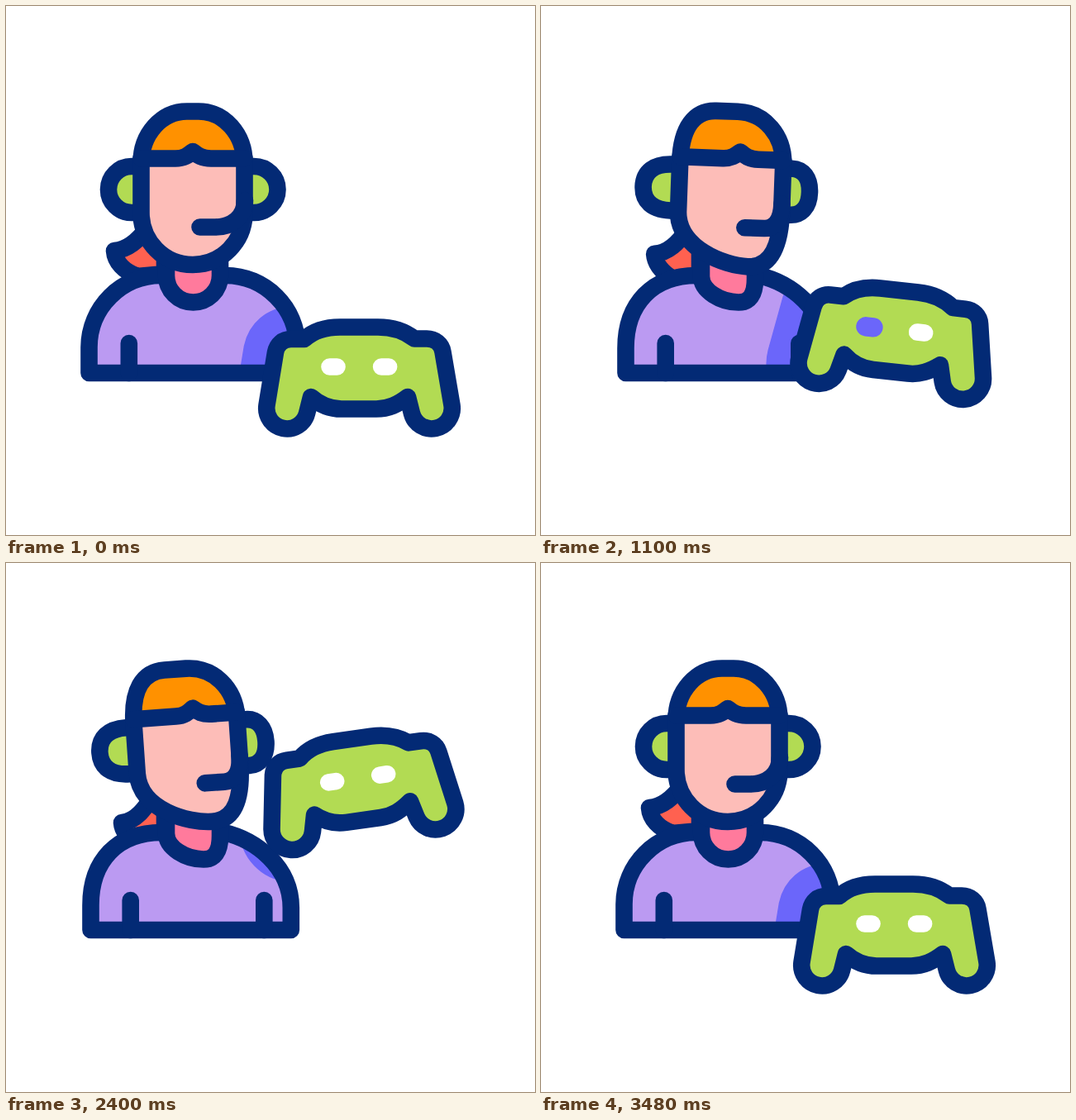
Animation, 640 px wide and 640 px high, one loop 3.6 s. Source, as an HTML page:

```html
<!DOCTYPE html>
<html lang="en">
<head>
<meta charset="utf-8">
<title>Gamer with headset</title>
<style>
  html, body { margin: 0; width: 100%; height: 100%; overflow: hidden; background: #fff; }
  svg { display: block; width: 100%; height: 100%; }
  .line { stroke: #032a75; stroke-width: 20.6; stroke-linecap: round; stroke-linejoin: round; fill: none; }
  .lime { fill: #b2db53; }
  .shade { fill: #6b66fa; stroke: #6b66fa; stroke-width: 78; stroke-linejoin: round; }
</style>
</head>
<body>
<svg viewBox="0 0 640 640">
  <defs>
    <path id="padShape" d="M345 403H361C372 393 387 388.5 404 388.5H450C467 388.5 482 393 494 402.5H509
      C519 402.5 527 409 528.5 418.5L539.5 483A24.8 24.8 0 0 1 491 493L486 473C474 482 463 487.5 448 487.5
      H406C391 487.5 379 482 369 473L364 493A24.8 24.8 0 0 1 315.5 483L326 419C328 409 335 403 345 403Z"/>
    <path id="body"/>
    <path id="skull"/>
    <clipPath id="torso"><use href="#body"/></clipPath>
  </defs>

  <path id="tail" class="line" style="fill:#ff6150"/>
  <use href="#body" fill="#bb9af2"/>
  <g clip-path="url(#torso)"><g class="pad"><use href="#padShape" class="shade"/></g></g>
  <use href="#body" class="line"/>
  <path id="arms" class="line"/>
  <path id="neck" class="line" style="fill:#ff7a9c"/>

  <g id="head">
    <path id="ears" class="line lime"/>
    <use href="#skull" fill="#fdbdb8"/>
    <path id="hair" fill="#ff9100"/>
    <use href="#skull" class="line"/>
    <path id="fringe" class="line"/>
    <path id="mic" class="line"/>
  </g>

  <g class="pad">
    <use href="#padShape" class="line lime"/>
    <rect id="leftKey"/>
    <rect id="rightKey"/>
  </g>
</svg>
<script>
const LOOP = 3600;
const $ = id => document.getElementById(id);
const pads = document.querySelectorAll('.pad');

// Each shape facing front, then turned towards the controller
const shapes = {
  body: [
    'M100.5 444V413C100.5 365 139.5 326 187.5 326H265.5C313.5 326 352.5 365 352.5 413V444Z',
    'M102.5 444V414C102.5 360 135 326 188 326H264C302 335 344.8 367 344.8 417V444Z'],
  arms: [
    'M148.8 408V444M336 408V444',
    'M150.7 408V444M312.3 408V444'],
  neck: [
    'M194 296V326C194 344 208.5 358.5 226.5 358.5C244.5 358.5 259 344 259 326V296',
    'M194 296V327C194 345 218 358.5 239 358.5C252 358.5 259 350 259 330V296'],
  ears: [
    'M163 194H152C136.5 194 124 206.5 124 222C124 237.5 136.5 250 152 250H163M289 194H300C315.5 194 328.5 206.5 328.5 222C328.5 237.5 315.5 250 300 250H289',
    'M163 194H154C132 194 120 204 120 222C120 240 132 250 154 250H163M289 194H299C313 194 321.5 205 321.5 222C321.5 239 313 250 299 250H289'],
  skull: [
    'M163.5 250V190C163.5 155 188 127.5 219 127.5H233C264 127.5 288.5 155 288.5 190V250C288.5 284.5 261 313 226 313C191 313 163.5 284.5 163.5 250Z',
    'M163.5 250V190C163.5 150 178 127.5 205 127.5H231C264 127.5 288.5 155 288.5 190V245C288.5 285 280 314.5 250 314.5C222 314.5 163.5 295 163.5 250Z'],
  hair: [
    'M163.5 184.5C163.5 155 188 127.5 219 127.5H233C264 127.5 288.5 155 288.5 184.5Z',
    'M163.5 184.5C163.5 150 178 127.5 205 127.5H231C264 127.5 288.5 155 288.5 184.5Z'],
  fringe: [
    'M163.5 184.5H205C216 184.5 221 180 226 176C231 180 236 184.5 248 184.5H288.5',
    'M163.5 184.5H215C226 184.5 231 180 236 176C241 180 246 184.5 258 184.5H288.5'],
  mic: [
    'M234.5 267.5H253C274 267.5 289 255 289 235',
    'M244.5 267.5H268C281 267.5 288.5 257 288.5 237']
};

// Keys: time, value; eased with half cosines
const tracks = {
  turn: [[0, 0], [660, 1], [2720, 1], [3480, 0]],
  nod: [[0, 0], [720, -4.1], [1480, 8.2], [2370, -4], [3440, 0]],
  padY: [[0, 436.5], [725, 258], [1448, 509.5], [2325, 257], [3228, 449.5], [3480, 436.5]],
  padTilt: [[0, 0], [650, -9], [1150, 6.6], [1350, 6.6], [2320, -8.8], [2890, 6.1], [3480, 0]],
  tailX: [[0, 131], [680, 141], [1540, 133], [2400, 140], [2860, 130], [3480, 131]],
  tailY: [[0, 296], [750, 314], [1550, 279], [2400, 314], [2880, 296.5], [3480, 296]]
};

const lerp = (a, b, k) => a + (b - a) * k;

function value(keys, t) {
  const i = keys.findIndex(key => key[0] > t);
  if (i < 0) return keys[keys.length - 1][1];
  const [t0, a] = keys[i - 1], [t1, b] = keys[i];
  return lerp(a, b, (1 - Math.cos(Math.PI * (t - t0) / (t1 - t0))) / 2);
}

function mix([a, b], k) {
  const to = b.match(/[\d.]+/g);
  let i = 0;
  return a.replace(/[\d.]+/g, n => lerp(+n, +to[i++], k).toFixed(2));
}

function setKey(id, x, lit) {
  const w = lit ? 32.5 : 29.6, h = lit ? 23.4 : 20.6;
  const attrs = { x: x - w / 2, y: 436.5 - h / 2, width: w, height: h, rx: h / 2, fill: lit ? '#6b66fa' : '#fff' };
  for (const name in attrs) $(id).setAttribute(name, attrs[name]);
}

function draw(t) {
  const v = {};
  for (const name in tracks) v[name] = value(tracks[name], t);
  for (const id in shapes) $(id).setAttribute('d', mix(shapes[id], v.turn));

  $('head').setAttribute('transform', `rotate(${v.nod} 226 320)`);

  const x = v.tailX, y = v.tailY, lift = y - 296, base = 327 + lift * 0.7;
  $('tail').setAttribute('d', `M${x + 39} ${270 + lift * 0.6}C${x + 29} ${283 + lift * 0.7} ${x + 17} ${y - 1} ${x} ${y}` +
    `C${x + 1} ${y + 14} ${x + 12} ${base - 6} 159 ${base}L192 ${324 + lift * 0.5}V290Z`);

  const dx = v.padTilt * 0.2;
  for (const pad of pads)
    pad.setAttribute('transform', `translate(${dx} ${v.padY - 436.5}) rotate(${v.padTilt} 427.3 436.5)`);

  const beat = t % 1200;
  setKey('leftKey', 396, beat >= 800 && beat < 1160 && t < 3400);
  setKey('rightKey', 458.6, beat >= 200 && beat < 600);
}

function frame() {
  draw(performance.now() % LOOP);
  requestAnimationFrame(frame);
}
frame();
</script>
</body>
</html>
```
